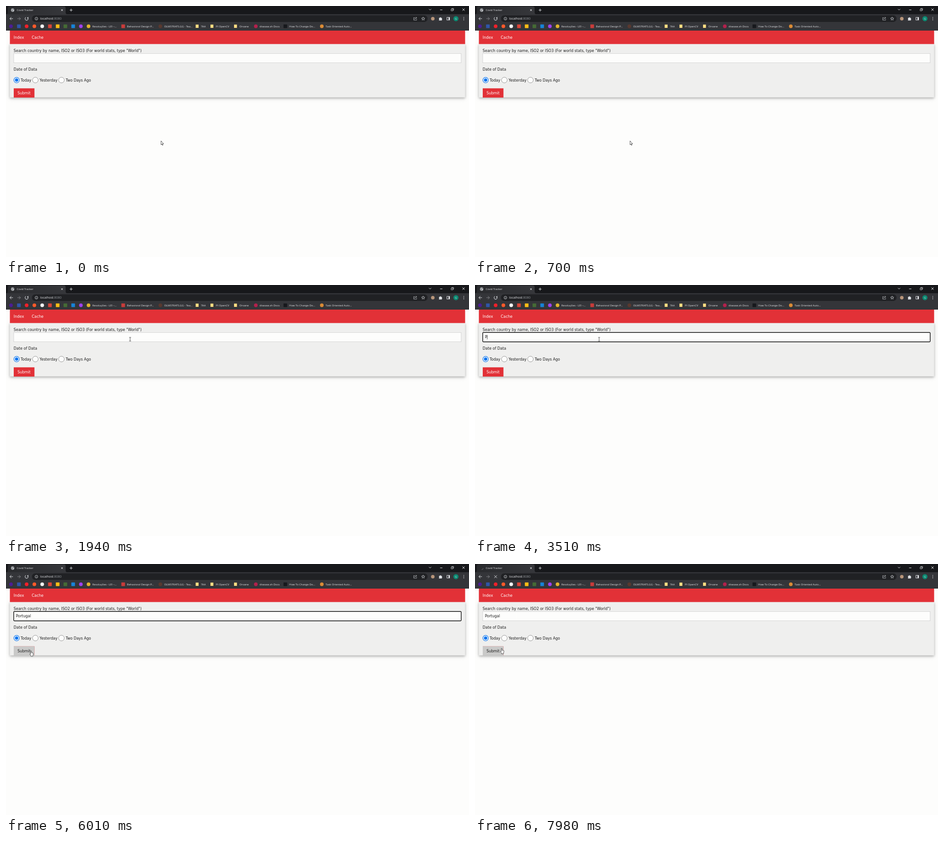
Write an HTML page that moves like this. It is 1017x551 px and loops after 8 s.

```html
<!DOCTYPE html>
<html lang="en">
<head>
<meta charset="utf-8">
<title>Covid Tracker</title>
<style>
  html, body { margin: 0; width: 100%; height: 100%; overflow: hidden; background: #fdfdfc; }
  svg { display: block; width: 100%; height: 100%; }
  text { white-space: pre; }
  .ui { font: 5.95px "Open Sans", "Noto Sans", sans-serif; fill: #e4e5e8; }
  .page { font: 8.1px "DejaVu Sans", Verdana, sans-serif; fill: #1c1c1c; }
  .page .light { fill: #fff; }
  .line { fill: none; stroke: #dfe1e5; stroke-width: 1; }
  .card { filter: drop-shadow(0 2px 2.5px rgba(0,0,0,.24)) drop-shadow(0 2px 4px rgba(0,0,0,.12)); }

  /* One shared 8 s loop; state changes are hard steps. */
  .step { animation: 8s step-end infinite; }
  #cursor { animation: move 8s linear infinite; }
  #arrow { animation-name: arrow; }
  #beam { animation-name: beam; }
  #hand, .hover { animation-name: hover; }
  #focus { animation-name: focus; }
  #caret { animation-name: caret; }
  #typer { animation-name: type; }
  .idle { animation-name: idle; }
  .loading { animation-name: loading; }
  #spinner { transform-origin: 14.6px 9px; animation: spin 1.6s linear infinite; }

  @keyframes move {
    0%, 10.875% { transform: translate(340px, 296px); animation-timing-function: ease-out; }
    12% { transform: translate(340.5px, 298px); animation-timing-function: cubic-bezier(.5, 0, .8, .6); }
    20.875% { transform: translate(290px, 204px); animation-timing-function: cubic-bezier(.3, .4, .6, 1); }
    24.25%, 69.5% { transform: translate(272.6px, 119px); }
    69.75% { transform: translate(274px, 119.6px); animation-timing-function: ease-in; }
    71% { transform: translate(279px, 128px); animation-timing-function: cubic-bezier(.4, .1, .5, 1); }
    75%, 84% { transform: translate(55px, 190.5px); animation-timing-function: ease-in-out; }
    92%, to { transform: translate(58.6px, 185px); }
  }
  @keyframes arrow { 0%, 70.7% { opacity: 1 } 23.4%, 74.2%, to { opacity: 0 } }
  @keyframes beam { 0%, 70.7%, to { opacity: 0 } 23.4% { opacity: 1 } }
  @keyframes hover { 0%, to { opacity: 0 } 74.2% { opacity: 1 } }
  @keyframes focus { 0%, 83.5%, to { opacity: 0 } 32.125% { opacity: 1 } }
  @keyframes caret {
    0%, 38.375%, 70.125%, 83.5%, to { opacity: 0 }
    32.125%, 43.875%, 76.75% { opacity: 1 }
  }
  @keyframes type {
    0% { transform: translateX(0) }
    43.875% { transform: translateX(4.9px) }
    47.625% { transform: translateX(9.7px) }
    49.625% { transform: translateX(13px) }
    55.125% { transform: translateX(16.2px) }
    58% { transform: translateX(21.2px) }
    59.25% { transform: translateX(26.3px) }
    60.5% { transform: translateX(31.2px) }
    63.5%, to { transform: translateX(33.5px) }
  }
  @keyframes idle { 0% { opacity: 1 } 83.5%, to { opacity: 0 } }
  @keyframes loading { 0%, to { opacity: 0 } 83.5% { opacity: 1 } }
  @keyframes spin { to { transform: rotate(-360deg) } }
</style>
</head>
<body>
<svg viewBox="0 0 1017 551" preserveAspectRatio="none">
  <defs>
    <linearGradient id="tabFill"><stop stop-color="#292a2d"/><stop offset="1" stop-color="#36373b"/></linearGradient>
  </defs>
  <rect width="1017" height="551" fill="#fdfdfc"/>

  <!-- browser frame -->
  <rect width="1017" height="18" fill="#17181b"/>
  <rect y="18" width="1017" height="36" fill="#343539"/>
  <path d="M1 18Q4 18 4 14V5Q4 1 8 1H127Q131 1 131 5V14Q131 18 134 18Z" fill="url(#tabFill)"/>
  <rect x="57" y="20.5" width="869" height="14.5" rx="7.2" fill="#202124"/>

  <g class="step idle">
    <circle cx="14.6" cy="9" r="3.7" fill="#b5b8bc"/>
    <path d="M11.5 8L14 9.2L13.4 11.8M14.5 5.8L15.8 7.6L18 8" class="line" style="stroke:#55585d"/>
    <path d="M41.9 27.8A3.4 3.4 0 1 0 45.3 24.4Q47 24.4 48.3 26" class="line" transform="rotate(60 45.3 27.8)"/>
    <path d="M49 23.8V27H45.8Z" fill="#dfe1e5"/>
  </g>
  <g class="step loading">
    <path id="spinner" d="M18 9A3.4 3.4 0 0 1 14.6 12.4" class="line" style="stroke:#777a80;stroke-width:.8"/>
    <path d="M42.3 24.8L48.3 30.8M48.3 24.8L42.3 30.8" class="line"/>
  </g>

  <g class="line">
    <path d="M121 7L125 11M125 7L121 11M143 5.8V12.2M139.8 9H146.2"/>
    <path d="M929 6.5L931.5 9L934 6.5M953.5 8.5H958.5M1002.5 5.5L1007.5 10.5M1007.5 5.5L1002.5 10.5"/>
    <path d="M977.8 7H981.8V10.6H977.8ZM979.2 7V5.4H983.2V9H981.8" stroke-width=".8"/>
    <path d="M15.3 27.8H8.6M11.8 24.4L8.4 27.8L11.8 31.2"/>
    <path d="M25 27.8H31.7M28.5 24.4L31.9 27.8L28.5 31.2" stroke="#85878b"/>
    <circle cx="66.8" cy="27.8" r="3.1" stroke-width=".8"/>
    <path d="M66.8 27.3V29.6M66.8 25.9V26.6" stroke-width=".8"/>
    <path d="M898 25.5H895.6V31H902V29M897.5 29Q898 26 901.5 26M900 24.2L902.4 26L900 27.8" stroke-width=".7"/>
    <path d="M916.3 24.2L917.3 26.6L919.9 26.8L917.9 28.5L918.5 31L916.3 29.6L914.1 31L914.7 28.5L912.7 26.8L915.3 26.6Z" stroke-width=".8"/>
    <rect x="968.5" y="25" width="6" height="5.8"/>
  </g>
  <rect x="972" y="25" width="2.6" height="5.8" fill="#dfe1e5"/>
  <path d="M951 26H953A1.3 1.3 0 0 1 955.6 26H957.4V28A1.2 1.2 0 0 1 957.4 30.2V31.8H951V29.8A1 1 0 0 0 951 28Z" fill="#dfe1e5"/>
  <circle cx="937.5" cy="27.8" r="3.9" fill="#b8957a"/>
  <circle cx="988.3" cy="27.8" r="5.6" fill="#0b8a72"/>
  <g fill="#dfe1e5"><circle cx="1005.5" cy="25" r=".8"/><circle cx="1005.5" cy="27.8" r=".8"/><circle cx="1005.5" cy="30.6" r=".8"/></g>
  <g class="ui">
    <text x="23.5" y="11.2" font-size="5.85" style="font-size:5.85px">Covid Tracker</text>
    <text x="75" y="30.3" style="font-size:6.97px">localhost<tspan fill="#94979c">:8080</tspan></text>
    <text x="988.3" y="29.9" text-anchor="middle">G</text>
  </g>
  <g id="bookmarks" class="ui"></g>

  <!-- page -->
  <g class="page">
    <rect class="card" x="8.5" y="83" width="1000" height="117.6" fill="#efefee"/>
    <rect x="8.5" y="54" width="1000" height="29.5" fill="#e23137"/>
    <text class="light" x="16.8" y="72" style="font-size:8.3px">Index</text>
    <text class="light" x="56.5" y="72" style="font-size:8.3px">Cache</text>
    <text x="16.8" y="100.6">Search country by name, ISO2 or ISO3 (For world stats, type "World")</text>
    <rect x="17" y="104.3" width="982.8" height="20.4" fill="#fdfdfc" stroke="#ccc" stroke-width=".8"/>
    <text x="21.8" y="117.4" style="font-size:8px">Portugal</text>
    <g id="typer" class="step">
      <rect x="21.6" y="108" width="36" height="13" fill="#fdfdfc"/>
      <path id="caret" class="step" d="M21.9 109.5V119.3" stroke="#111" stroke-width=".8"/>
    </g>
    <rect id="focus" class="step" x="17" y="104.3" width="982.8" height="20.4" rx="1.4" fill="none" stroke="#0b0b0b" stroke-width="1.4"/>
    <text x="16.8" y="142">Date of Data</text>
    <g fill="#fdfdfc" stroke="#808080" stroke-width=".8">
      <circle cx="23.3" cy="162.6" r="6" stroke="#0a75f0" stroke-width="1.2"/>
      <circle cx="64.5" cy="162.6" r="6.2"/>
      <circle cx="121.8" cy="162.6" r="6.2"/>
    </g>
    <circle cx="23.3" cy="162.6" r="3.7" fill="#0a75f0"/>
    <text x="32.2" y="165.5">Today</text>
    <text x="73.8" y="165.5">Yesterday</text>
    <text x="131.2" y="165.5" style="font-size:8px">Two Days Ago</text>
    <rect x="17" y="180.7" width="45.5" height="20.3" fill="#e23137"/>
    <text class="light" x="25.2" y="193.8">Submit</text>
    <g class="step hover">
      <rect x="17" y="180.7" width="45.5" height="20.3" fill="#c9c9c8"/>
      <text x="25.2" y="193.8">Submit</text>
    </g>
  </g>

  <g id="cursor" stroke-linejoin="round">
    <path id="arrow" class="step" d="M.4 0V8.6L2.3 6.9L3.6 9.8L4.9 9.2L3.6 6.4H6.2Z" fill="#fff" stroke="#222" stroke-width=".8"/>
    <path id="beam" class="step" d="M-2 -4H-.5L0 -3.6L.5 -4H2M0 -3.6V3.6M-2 4H-.5L0 3.6L.5 4H2" fill="none" stroke="#333" stroke-width=".9"/>
    <path id="hand" class="step" d="M-1 .8Q0 -.6 1 .8V4.2L4 4.9Q5.2 5.2 5 6.8L4 10.2V12H-.3V10.6L-3 7.4Q-3 6 -1 7.2Z" fill="#fff" stroke="#222" stroke-width=".8"/>
  </g>
</svg>
<script>
  // [x, colour, shape, label]
  const bookmarks = [
    [11, '#4c1d95', 'circle'], [28.3, '#2f55a8', 'square'], [45.3, '#f0202a', 'circle'],
    [62.3, '#ff5a2a', 'circle'], [79.5, '#f4f4f4', 'circle'], [96.5, '#dc4437', 'square'],
    [113.5, '#fbbd16', 'square'], [130.4, '#456b35', 'square'], [147.5, '#1683d8', 'square'],
    [164.5, '#a040f0', 'circle'],
    [181.3, '#e0b52c', 'circle', 'Resoluções - LEI –...'],
    [257.4, '#c83c3a', 'square', 'Behavioral Design P...'],
    [339, '#59392f', 'circle', 'OLMSTRATS.GG - Tea...'],
    [420, '#ffdd82', 'folder', 'TAA'],
    [452.5, '#ffdd82', 'folder', 'PI OpenCV'],
    [504.3, '#ffdd82', 'folder', 'Orvane'],
    [548.7, '#b3204c', 'circle', 'disease.sh Docs'],
    [613.6, '#17191d', 'square', 'How To Change Do...'],
    [693.7, '#d98b35', 'circle', 'Task Oriented Auto...'],
  ];
  const shapes = {
    circle: (x, fill) => `<circle cx="${x}" cy="44.5" r="4" fill="${fill}"/>`,
    square: (x, fill) => `<rect x="${x - 4}" y="40.5" width="8" height="8" rx=".8" fill="${fill}"/>`,
    folder: (x, fill) => `<path d="M${x - 3.4} 40.8H${x + 3}V48H${x - 3.4}Z" fill="${fill}"/>`,
  };
  document.getElementById('bookmarks').innerHTML = bookmarks.map(([x, fill, shape, label]) =>
    shapes[shape](x, fill) + (label ? `<text x="${x + 8.4}" y="46.6">${label}</text>` : '')
  ).join('');
</script>
</body>
</html>
```
